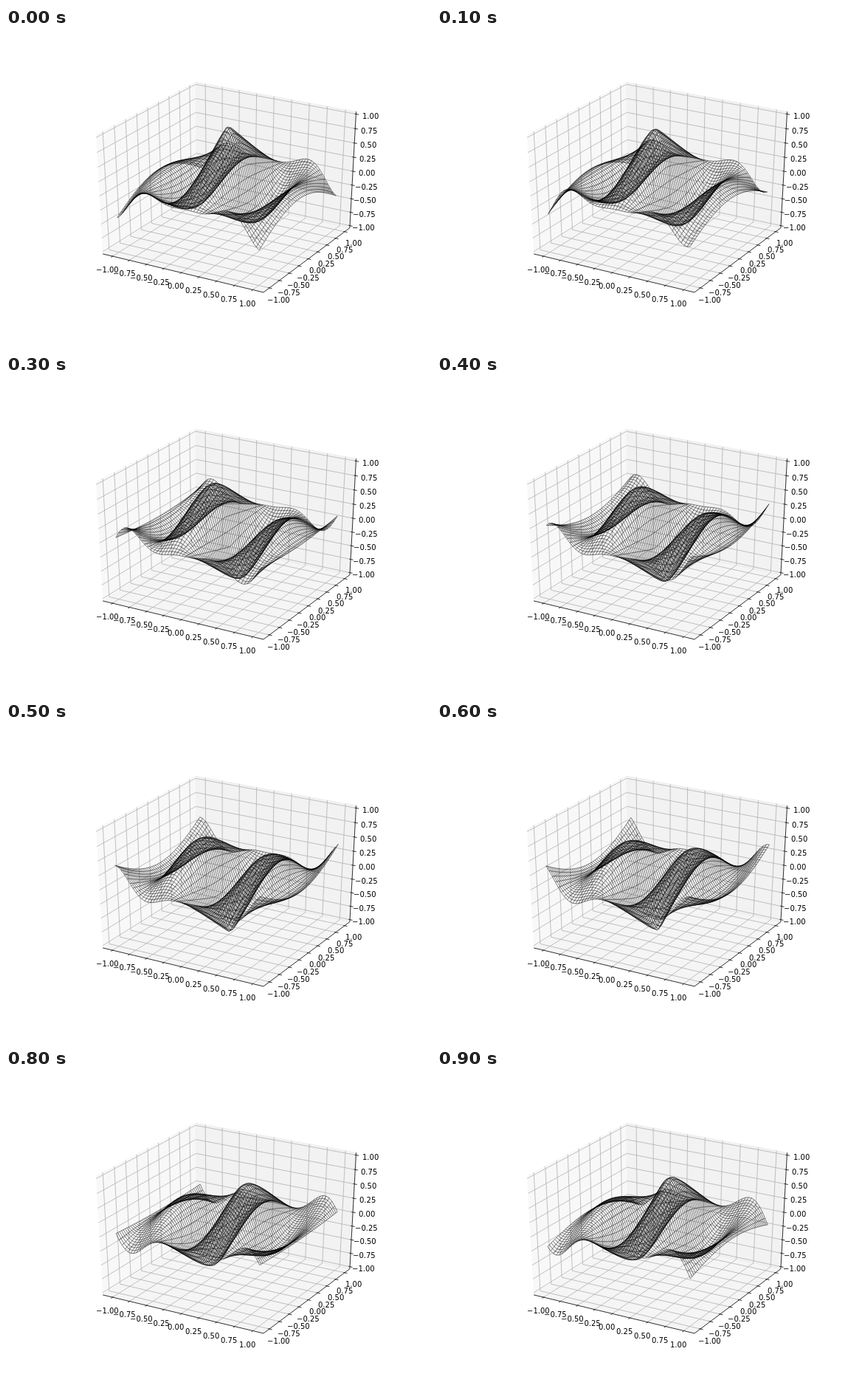
Recreate the animation shown at these times as an HTML page with a canvas. Size 576 px wide and 432 px high, loop 1 s.

```html
<!DOCTYPE html>
<html lang="en">
<head>
<meta charset="utf-8">
<title>Rotating phase wireframe</title>
<style>
  html, body { margin: 0; width: 100%; height: 100%; overflow: hidden; background: #fff; }
  canvas { display: block; }
</style>
</head>
<body>
<canvas id="stage" width="576" height="432"></canvas>
<script>
const ctx = document.getElementById('stage').getContext('2d');

const STEP_MS = 100, STEPS = 10;
const PHASE_STEP = 180 / Math.PI / 99;
const N = 50;

// Axes box in pixels and the perspective camera
const BOX = { left: 72, bottom: 378, w: 446.4, h: 326.16 };
const DIST = 10, VIEW = 0.185, VIEW_LOW = 0.095;
const ELEV = Math.PI / 6, AZIM = -Math.PI / 3;
const ce = Math.cos(ELEV), se = Math.sin(ELEV);
const ca = Math.cos(AZIM), sa = Math.sin(AZIM);

// Unit cube centred on the origin
const EDGE = 0.5 + 1 / 48;
const DELTA = 1 / 12;
const LABEL_GAP = 11.5 * 48 / (BOX.w + BOX.h) * DELTA;
const LIMITS = [1.1, 1.1, 1];

function project([x, y, z]) {
  const right = -sa * x + ca * y;
  const up = -se * (ca * x + sa * y) + ce * z;
  const depth = DIST - (ce * (ca * x + sa * y) + se * z);
  return [
    BOX.left + (right / depth + VIEW_LOW) / VIEW * BOX.w,
    BOX.bottom - (up / depth + VIEW_LOW) / VIEW * BOX.h
  ];
}

function trace(points) {
  points.forEach((p, i) => {
    const [x, y] = project(p);
    if (i) ctx.lineTo(x, y); else ctx.moveTo(x, y);
  });
}

function line(points, color, width) {
  ctx.beginPath();
  trace(points);
  ctx.strokeStyle = color;
  ctx.lineWidth = width;
  ctx.stroke();
}

function withAt(point, index, value) {
  const p = point.slice();
  p[index] = value;
  return p;
}

function drawPane(points, shade) {
  ctx.beginPath();
  trace(points);
  ctx.fillStyle = `rgba(${shade}, ${shade}, ${shade}, 0.5)`;
  ctx.fill();
  line(points, ctx.fillStyle, 1);
}

const BACK = [-EDGE, EDGE, -EDGE];
const AXES = [
  { index: 0, edge: [0, -EDGE, -EDGE], tickDir: 1 },
  { index: 1, edge: [EDGE, 0, -EDGE], tickDir: 0 },
  { index: 2, edge: [EDGE, EDGE, 0], tickDir: 0 }
];

function drawAxis({ index, edge, tickDir }) {
  const ticks = Array.from({ length: 9 }, (_, i) => (i - 4) / 4);
  const side = Math.sign(edge[tickDir]);

  line([withAt(edge, index, -EDGE), withAt(edge, index, EDGE)], '#000', 0.8);

  for (const value of ticks) {
    const at = value / LIMITS[index] / 2;
    const corner = withAt(BACK, index, at);
    const a = (index + 1) % 3, b = (index + 2) % 3;
    line([withAt(corner, a, -corner[a]), corner, withAt(corner, b, -corner[b])], '#b0b0b0', 0.8);
  }

  for (const value of ticks) {
    const pos = withAt(edge, index, value / LIMITS[index] / 2);
    line([
      withAt(pos, tickDir, pos[tickDir] - side * 0.1 * DELTA),
      withAt(pos, tickDir, pos[tickDir] + side * 0.2 * DELTA)
    ], '#000', 0.8);

    const labelPos = pos.map((v, i) => i === index ? v : v + Math.sign(v) * LABEL_GAP);
    const [x, y] = project(labelPos);
    const text = (value < 0 ? '\u2212' : '') + Math.abs(value).toFixed(2);
    ctx.fillText(text, Math.round(x - ctx.measureText(text).width / 2), Math.round(y + 8));
  }
}

function drawAxes() {
  const E = EDGE;
  drawPane([[-E, -E, -E], [-E, E, -E], [-E, E, E], [-E, -E, E]], 242);
  drawPane([[-E, E, -E], [E, E, -E], [E, E, E], [-E, E, E]], 230);
  drawPane([[-E, -E, -E], [E, -E, -E], [E, E, -E], [-E, E, -E]], 236);
  ctx.fillStyle = '#000';
  ctx.font = '10px "DejaVu Sans", sans-serif';
  AXES.forEach(drawAxis);
}

function surface(x, y, phase) {
  const z = Math.cos(2 * Math.PI * x + phase) * (1 - Math.hypot(x, y));
  return [x / LIMITS[0] / 2, y / LIMITS[1] / 2, z / 2];
}

function drawMesh(phase) {
  const grid = Array.from({ length: N }, (_, i) => -1 + 2 * i / (N - 1));
  for (const y of grid) line(grid.map(x => surface(x, y, phase)), '#000', 0.5);
  for (const x of grid) line(grid.map(y => surface(x, y, phase)), '#000', 0.5);
}

function draw(step) {
  ctx.fillStyle = '#fff';
  ctx.fillRect(0, 0, 576, 432);
  drawAxes();
  drawMesh(step * PHASE_STEP);
}

let start = null, shown = -1;

function tick() {
  const now = performance.now();
  if (start === null) start = now;
  const step = Math.floor((now - start) / STEP_MS) % STEPS;
  if (step !== shown) draw(shown = step);
  requestAnimationFrame(tick);
}

tick();
</script>
</body>
</html>
```
